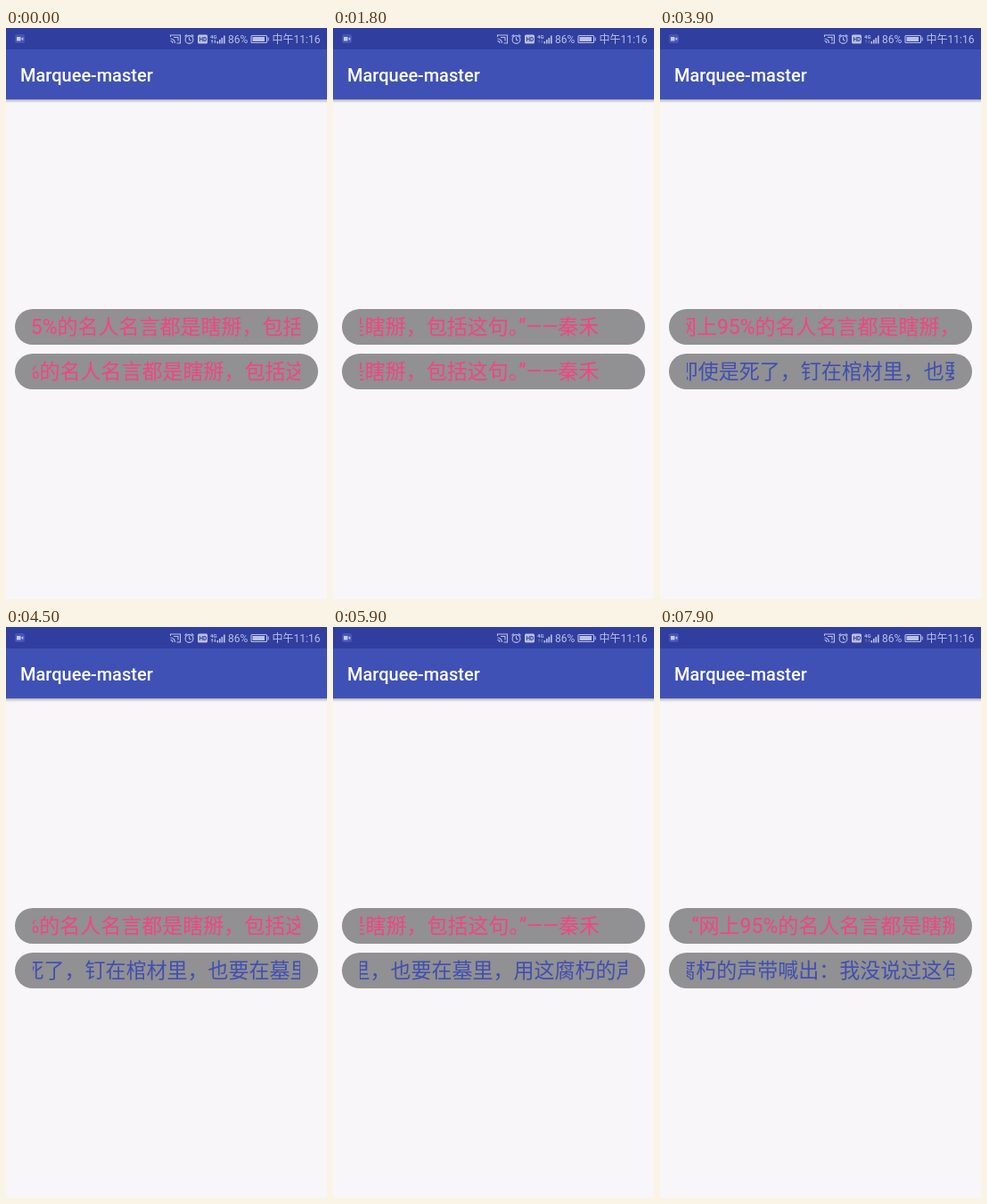
An HTML page that plays this animation: 360x640 px, repeating every 8000 ms.

```html
<!DOCTYPE html>
<html lang="zh-CN">
<head>
<meta charset="utf-8">
<title>Marquee-master</title>
<style>
  html, body { margin: 0; width: 100%; height: 100%; overflow: hidden; background: #f8f6f9; }
  svg { display: block; width: 100vw; height: 100vh; }
  text { font-family: Roboto, "Noto Sans CJK SC", "Noto Sans CJK", sans-serif; }
  .row text { font-size: 23px; }
  .pink { fill: #f4447f; }
  .blue { fill: #3f4fb3; }
</style>
</head>
<body>
<svg viewBox="0 0 360 640">
  <defs>
    <linearGradient id="shade" x2="0" y2="1">
      <stop offset="0" stop-color="#000" stop-opacity=".28"/>
      <stop offset="1" stop-color="#000" stop-opacity="0"/>
    </linearGradient>
    <clipPath id="clip"><rect x="30" width="300" height="40"/></clipPath>
  </defs>

  <rect width="360" height="640" fill="#f8f6f9"/>
  <rect y="80" width="360" height="4" fill="url(#shade)"/>
  <rect width="360" height="80" fill="#3f51b5"/>
  <rect width="360" height="24" fill="#303f9f"/>
  <text x="16" y="59.5" font-size="20" font-weight="500" fill="#fff">Marquee-master</text>

  <!-- status bar -->
  <rect x="10" y="7" width="11" height="10" rx="2" fill="#4656b4"/>
  <path d="M12 10h4.5v4.500H12zM17 12l2.300-1.700v4z" fill="#c3caec"/>
  <g fill="none" stroke="#b9c0e4" stroke-width="1.100">
    <path d="M184.500 10V8h11v9h-4M184.500 12a5 5 0 0 1 5 5M184.500 14.500a2.500 2.500 0 0 1 2.500 2.500"/>
    <path d="M188 10.500h5v4"/>
    <circle cx="205.500" cy="13" r="4.400"/>
    <path d="M205.500 10.300V13l2 1.300M200.500 9.500l2.300-2M210.500 9.500l-2.300-2"/>
    <rect x="275" y="8.500" width="17.500" height="8" rx="1"/>
    <path d="M294.200 10.500v4"/>
  </g>
  <g fill="#b9c0e4">
    <rect x="215" y="7.500" width="11" height="10" rx="1.500"/>
    <rect x="276.500" y="10" width="13.500" height="5"/>
    <path d="M236.500 15h1.600v2.500h-1.600zM239 13h1.600v4.500H239zM241.500 11h1.600v6.500h-1.600zM244 8.500h1.600v9H244z"/>
    <text x="229" y="11.500" font-size="6" font-weight="700">4G</text>
    <path id="data" d="M229.800 15l1.300-2 1.300 2zM230.700 15h.8v2.300h-.8zM233 15.300l1.300 2 1.300-2zM233.900 13h.8v2.300h-.8z"/>
    <text x="249" y="17" font-size="12">86%</text>
    <text x="298.500" y="17" font-size="12">中午11:16</text>
  </g>
  <text x="216.500" y="15" font-size="6.500" font-weight="700" fill="#303f9f">HD</text>

  <g id="rows"></g>
</svg>
<script>
const LOOP = 8000, SPEED = 0.1156, HEIGHT = 40, FLIP = 950;
const quotes = [
  { mark: '1.', body: '网上95%的名人名言都是瞎掰，包括这句。”——秦禾', tone: 'pink', max: 269 },
  { mark: '2.', body: '我即使是死了，钉在棺材里，也要在墓里，用这腐朽的声带喊出：我没说过这句话！”', tone: 'blue', max: 700 }
];

// Each pass: which quote, when it flips in, when it starts to scroll.
const rows = [
  { y: 315, passes: [[0, -1700, -744], [0, 2625, 3580], [0, 6850, 7802]] },
  { y: 365, passes: [[0, -1890, -917], [1, 2435, 3397]] }
];

const ease = p => 0.5 - Math.cos(Math.PI * Math.min(1, Math.max(0, p))) / 2;

const quoteMarkup = ({ mark, body, tone }) =>
  `<text class="${tone}" y="28"><tspan x="30">${mark}</tspan>` +
  `<tspan x="46.9">“</tspan><tspan x="55">${body}</tspan></text>`;

document.getElementById('rows').innerHTML = rows.map(r =>
  `<g class="row" transform="translate(0 ${r.y})">
    <rect x="10" width="340" height="40" rx="20" fill="#919092"/>
    <g clip-path="url(#clip)">${r.passes.map(p => quoteMarkup(quotes[p[0]])).join('')}</g>
  </g>`).join('');

document.querySelectorAll('.row').forEach((g, i) => {
  rows[i].texts = g.querySelectorAll('text');
});
const data = document.getElementById('data');

function draw(t) {
  for (const { passes, texts } of rows) {
    passes.forEach(([q, flip, start], i) => {
      const next = passes[i + 1];
      const enter = ease((t - flip) / FLIP);
      const leave = next ? ease((t - next[1]) / FLIP) : 0;
      const x = -Math.min(quotes[q].max, Math.max(0, (t - start) * SPEED));
      const y = HEIGHT * (1 - enter - leave);
      texts[i].setAttribute('transform', `translate(${x.toFixed(2)} ${y.toFixed(2)})`);
      texts[i].style.display = enter > 0 && leave < 1 ? '' : 'none';
    });
  }
  const busy = t < 1000 || (t >= 4400 && t < 5300);
  data.setAttribute('opacity', busy ? 1 : 0.35);
}

const began = performance.now();
function tick() {
  draw((performance.now() - began) % LOOP);
  requestAnimationFrame(tick);
}
tick();
</script>
</body>
</html>
```
